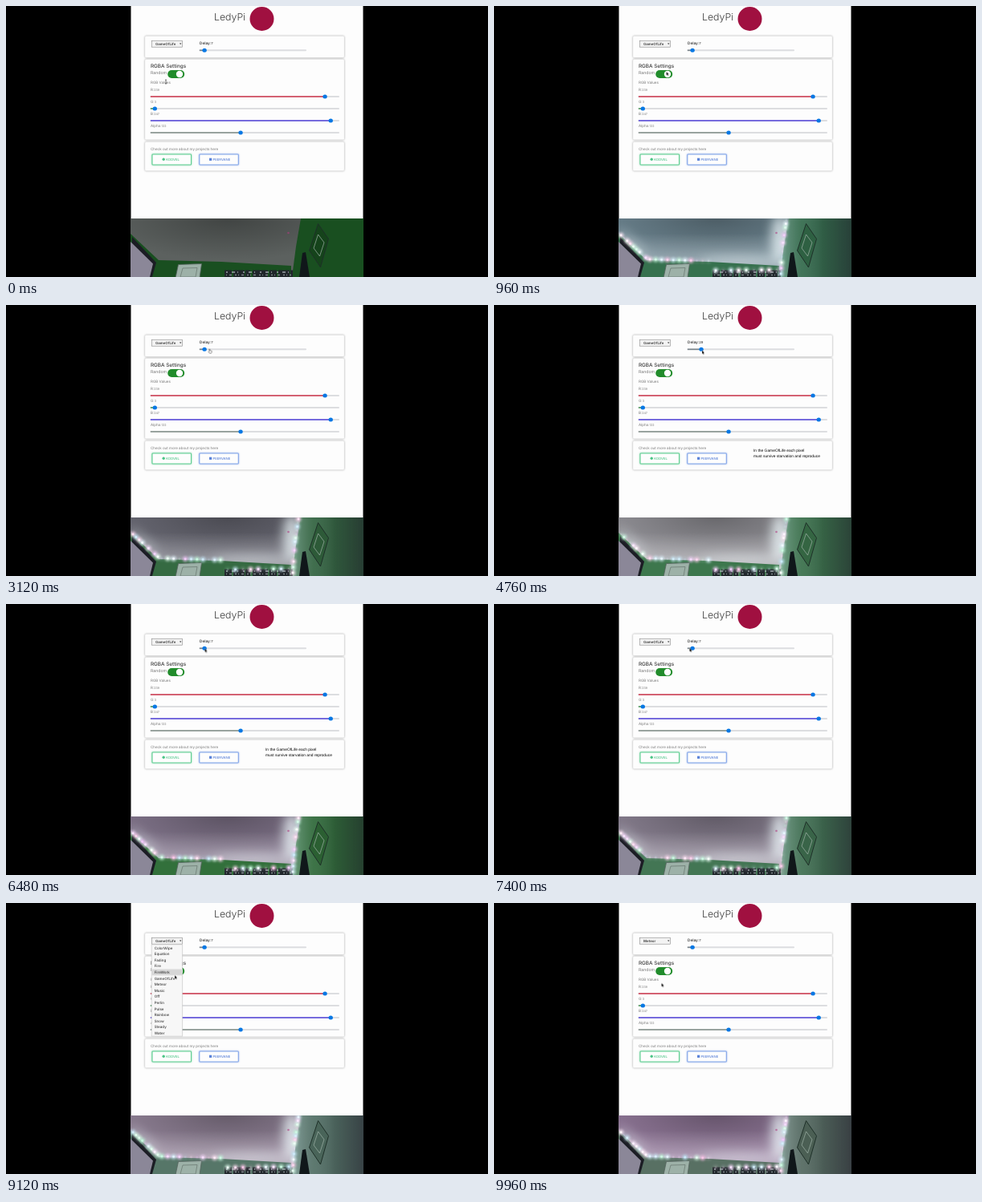
An HTML page that plays this animation: 600 by 338 pixels, repeating every 10000 ms.

```html
<!DOCTYPE html>
<html lang="en">
<head>
<meta charset="utf-8">
<title>LedyPi</title>
<style>
html, body { margin: 0; width: 100%; height: 100%; overflow: hidden; background: #000; }
svg { display: block; width: 100vw; height: 100vh; }
text { font-family: Inter, sans-serif; text-rendering: geometricPrecision; fill: #3a3a3a; }
.soft { fill: #777; }
.note { font-family: "Liberation Sans", Arial, sans-serif; font-size: 4.9px; fill: #000; }
.card { fill: #fdfdfd; stroke: #e6e6e6; stroke-width: .4; filter: drop-shadow(0 .7px .8px #0005); }
.button { fill: #fdfdfd; stroke-width: 1.1; }

.step { animation: 10s step-end infinite; }
.note1 { animation-name: note1; }
.note2 { animation-name: note2; }
.menu { animation-name: menu; }
.hover { animation-name: hover; }
.life { animation-name: life; }
.meteor { animation-name: meteor; }
.beam { animation-name: beam; }
.hand { animation-name: hand; }
.arrow { animation-name: arrow; }
@keyframes note1 { 0% { opacity: 0 } 10.4% { opacity: 1 } 28% { opacity: 0 } }
@keyframes note2 { 0% { opacity: 0 } 36% { opacity: 1 } 70% { opacity: 0 } }
@keyframes menu { 0% { opacity: 0 } 81.6% { opacity: 1 } 96.4% { opacity: 0 } }
@keyframes hover {
  0% { transform: none }
  87% { transform: translateY(-38px); animation-timing-function: steps(6) }
  92.7%, 100% { transform: translateY(7.6px) }
}
@keyframes life { 0% { opacity: 1 } 96.4% { opacity: 0 } }
@keyframes meteor { 0% { opacity: 0 } 96.4% { opacity: 1 } }
@keyframes beam { 0% { opacity: 1 } 9% { opacity: 0 } }
@keyframes hand { 0% { opacity: 0 } 28% { opacity: 1 } 34% { opacity: 0 } }
@keyframes arrow { 0% { opacity: 0 } 9% { opacity: 1 } 28% { opacity: 0 } 34% { opacity: 1 } }

.cursor { animation: move 10s ease-in-out infinite; }
@keyframes move {
  0%, 4% { transform: translate(199px, 92px) }
  15%, 20% { transform: translate(229px, 72.5px) }
  30%, 31.5% { transform: translate(253.5px, 55px) }
  34%, 35% { transform: translate(247.5px, 56px) }
  40%, 53% { transform: translate(259px, 56.5px) }
  60%, 72% { transform: translate(247.5px, 55.5px) }
  80%, 85% { transform: translate(216px, 51px) }
  94%, 100% { transform: translate(208.5px, 99.8px) }
}

.ceiling { animation: ceiling 10s linear infinite; }
.wall { animation: wall 10s linear infinite; }
.lit { animation: lit 10s linear infinite; }
@keyframes ceiling {
  0%, 4% { fill: #5c615f } 9% { fill: #6d8490 } 18.8% { fill: #7195a5 }
  31.2% { fill: #6b6b76 } 47.6% { fill: #96959b } 64.8% { fill: #84778e }
  83.2% { fill: #928c97 } 99.6%, 100% { fill: #92799a }
}
@keyframes wall {
  0%, 4% { fill: #194f20 } 9% { fill: #36704c } 18.8% { fill: #3c7a6a }
  31.2% { fill: #356a42 } 47.6% { fill: #3d774d } 64.8% { fill: #32703b }
  83.2% { fill: #547c6d } 99.6%, 100% { fill: #587063 }
}
@keyframes lit { 0%, 4% { opacity: 0 } 9%, 100% { opacity: 1 } }
</style>
</head>
<body>
<svg viewBox="0 0 600 338" preserveAspectRatio="none">
  <defs>
    <clipPath id="view"><path d="M155.5 265h289v73h-289z"/></clipPath>
    <filter id="blur" x="-100%" y="-100%" width="300%" height="300%"><feGaussianBlur stdDeviation="7"/></filter>
    <filter id="bloom" x="-20%" y="-20%" width="140%" height="140%"><feGaussianBlur stdDeviation="1.7"/></filter>
    <radialGradient id="shade" cx=".42" cy="0" r=".55" gradientTransform="matrix(1 0 0 1.3 0 0)">
      <stop offset="0" stop-color="#000" stop-opacity=".3"/>
      <stop offset="1" stop-color="#000" stop-opacity="0"/>
    </radialGradient>
    <linearGradient id="bounce" x2="0" y2="1">
      <stop offset=".25" stop-color="#fff" stop-opacity="0"/>
      <stop offset=".75" stop-color="#fff" stop-opacity=".3"/>
    </linearGradient>
    <linearGradient id="falloff">
      <stop offset="0" stop-color="#dff" stop-opacity=".35"/>
      <stop offset=".3" stop-color="#a9b" stop-opacity=".1"/>
      <stop offset=".6" stop-color="#1a1024" stop-opacity=".2"/>
      <stop offset="1" stop-color="#1a1024" stop-opacity=".5"/>
    </linearGradient>
  </defs>

  <path fill="#fdfdfd" d="M155.5 0h289v265h-289z"/>
  <text x="259" y="18.2" font-size="12.3" font-weight="300">LedyPi</text>
  <circle cx="318.5" cy="16" r="15" fill="#a01040"/>

  <rect class="card" x="173" y="37.5" width="248" height="26.8" rx="1.5"/>
  <rect class="card" x="173" y="66.5" width="248" height="100.3" rx="1.5"/>
  <rect class="card" x="173" y="169.5" width="248" height="36" rx="1.5"/>

  <rect x="181.6" y="43.2" width="37.8" height="8" fill="#f3f3f3" stroke="#888" stroke-width=".6"/>
  <g font-size="4.4" font-weight="600">
    <text class="step life" x="186" y="48.9">GameOfLife</text>
    <text class="step meteor" x="186" y="48.9">Meteor</text>
  </g>
  <path d="M216 46.4h2.4l-1.2 1.7z" fill="#222"/>
  <text x="241" y="48.2" font-size="4.7" font-weight="600">Delay:<tspan id="delay" font-size="4.1" font-weight="500">7</tspan></text>

  <text x="180" y="77.3" font-size="6.35" font-weight="500">RGBA Settings</text>
  <text class="soft" x="180" y="85.2" font-size="5.2">Random</text>
  <rect x="201.2" y="80" width="21" height="10" rx="5" fill="#218c2b"/>
  <circle cx="216" cy="85" r="4.2" fill="#fff"/>
  <text class="soft" x="180" y="97.3" font-size="4.55">RGB Values</text>
  <g id="sliders"></g>

  <text class="soft" x="180" y="179.9" font-size="4.5">Check out more about my projects here</text>
  <g font-size="4.2" font-weight="500">
    <rect class="button" x="182" y="185" width="48.5" height="13" rx=".8" stroke="#5fce92" style="filter:drop-shadow(0 .5px .8px #3cbd7899)"/>
    <circle cx="196.2" cy="191.3" r="1.7" fill="#4cc587"/>
    <text x="199.3" y="192.9" style="fill:#4cc587">KODVEL</text>
    <rect class="button" x="240.8" y="185" width="48.5" height="13" rx=".8" stroke="#7fa3e8" style="filter:drop-shadow(0 .5px .8px #658be099)"/>
    <rect x="253" y="189.7" width="3.2" height="3.2" fill="#5a82d8"/>
    <text x="257.5" y="192.9" style="fill:#5a82d8">PEERVANE</text>
  </g>
  <text class="note step note1" x="320.5" y="186.6">Patterns can also be games like this one</text>
  <g class="step note2">
    <text class="note" x="323" y="183.4">In the GameOfLife each pixel</text>
    <text class="note" x="323" y="189.9">must survive starvation and reproduce</text>
  </g>

  <g class="step menu">
    <path d="M181.2 51.8h38.4v114.4h-38.4z" fill="#f7f7f7" stroke="#b5b5b5" stroke-width=".5"/>
    <path class="step hover" d="M181.5 90.2h37.8v7.6h-37.8z" fill="#d6d6d6"/>
    <g id="items" font-size="4.5" font-weight="500"></g>
  </g>

  <g clip-path="url(#view)">
    <path class="ceiling" d="M155 265h290v73h-290z"/>
    <path fill="url(#shade)" d="M155 265h290v73h-290z"/>
    <g class="lit">
      <path fill="url(#bounce)" d="M155 265h212v73h-212z"/>
      <g filter="url(#blur)" fill="#f2fcff">
        <ellipse cx="356" cy="290" rx="11" ry="30" opacity=".75"/>
        <ellipse cx="172" cy="296" rx="24" ry="5" opacity=".4" transform="rotate(42 172 296)"/>
        <ellipse cx="305" cy="318" rx="50" ry="6" opacity=".4"/>
      </g>
    </g>

    <path class="wall" d="M155 284L190 317 268 319 355 324V338H155z"/>
    <path class="wall" d="M367 265H445V338H356L361 300z"/>
    <path class="lit" fill="url(#falloff)" d="M367 265H445V338H356L361 300z"/>

    <path fill="#1b1d24" d="M157 288L187 320 182 338H155z"/>
    <path fill="#8b8798" d="M155 294L183 321.5 179 338H155z"/>
    <path fill="#9db1a8" stroke="#55635d" stroke-width=".8" d="M214.5 322.5L243.5 321.5 241 339H211z"/>
    <path fill="none" stroke="#66756d" stroke-width=".7" d="M220 327L238 326.5 236 338H217z"/>
    <path class="wall" stroke="#22352d" stroke-width="1" d="M388.5 271.5L401.5 290.5 391.5 326 377.5 305z"/>
    <path fill="#000" opacity=".15" d="M388.5 271.5L401.5 290.5 391.5 326 377.5 305z"/>
    <path fill="none" stroke="#9fb3a8" stroke-width=".7" d="M388.5 285L396 295 390.5 312 383 302z"/>
    <path fill="#10171a" d="M369 308L373 307 378 338H365z"/>
    <path stroke="#20262b" stroke-width="9" stroke-dasharray="9 2 14 1 6 3 19 2" d="M272 334H357"/>
    <path stroke="#9aa3a6" stroke-width="1.6" stroke-dasharray="2 5 4 3 1 6" d="M274 332H355"/>
    <path stroke="#7c8588" stroke-width="1.4" stroke-dasharray="1 3 3 4 2 2" d="M274 335.5H355"/>
    <circle cx="351.5" cy="283" r="1.3" fill="#b03a80" opacity=".6"/>
    <g class="lit">
      <g id="glow" filter="url(#bloom)"></g>
      <g id="leds"></g>
    </g>
  </g>

  <g class="cursor">
    <path class="step beam" d="M-.8 0H.8M0 0V5M-.8 5H.8" stroke="#111" stroke-width=".6"/>
    <path class="step arrow" d="M0 0V4.6L1 3.7 1.8 5.3 2.6 4.9 1.8 3.3 3.2 3.2z" fill="#000" stroke="#fff" stroke-width=".25"/>
    <path class="step hand" d="M-.5 0H.3V1.8L2.6 2.3V4L2 5.2H-.2L-1.5 3.3-1 2.8-.5 3.2z" fill="#fff" stroke="#222" stroke-width=".45"/>
  </g>
</svg>
<script>
const LOOP = 10000;
const $ = id => document.getElementById(id);
const clamp = x => Math.min(1, Math.max(0, x));
const ease = x => x * x * (3 - 2 * x);
const rand = (a, b) => {
  const x = Math.sin(a * 12.9898 + b * 78.233) * 43758.5453;
  return x - Math.floor(x);
};

// The thumb travels inside the track, 2.6 px short of both ends.
const thumbX = (x, width, value) => x + 2.6 + (width - 5.2) * value / 255;

function slider(id, x, y, width, value, color) {
  const tx = thumbX(x, width, value);
  return `<path d="M${x} ${y}h${width}" stroke="#dcdde0" stroke-width="2" stroke-linecap="round"/>
    <path id="${id}Fill" d="M${x} ${y}H${tx}" stroke="${color}" stroke-width="1.6"/>
    <ellipse id="${id}Thumb" cx="${tx}" cy="${y}" rx="2.7" ry="2.5" fill="#0878e4"/>`;
}

const channels = [
  ['R', 239, '#d2384e'], ['G', 3, '#4d9b5f'],
  ['B', 247, '#5546dc'], ['Alpha', 122, '#83908a']
];
$('sliders').innerHTML = slider('delay', 241, 55.3, 132, 7, '#7b858c') +
  channels.map(([name, value, color], i) => {
    const y = 113 + 15 * i;
    return `<text class="soft" x="180" y="${y - 7.3}" font-size="4.5">${name}:<tspan font-size="3.7">${value}</tspan></text>` +
      slider(name, 180, y, 234, value, color);
  }).join('');

$('items').innerHTML = ('ColorWipe Equation Fading Fire FireWork GameOfLife Meteor Music ' +
  'Off Perlin Pulse Rainbow Snow Steady Water').split(' ')
  .map((name, i) => `<text x="184.7" y="${57.6 + 7.6 * i}">${name}</text>`).join('');

// LED runs: start, end, count
const runs = [
  [158, 286, 189, 314, 9], [194, 316, 267, 318, 11],
  [364, 267, 359, 300, 8], [359, 306, 357, 334, 5], [276, 330, 352, 329, 9]
];
const spots = runs.flatMap(([x1, y1, x2, y2, n]) =>
  Array.from({ length: n }, (_, i) => {
    const k = i / (n - 1);
    return [x1 + (x2 - x1) * k, y1 + (y2 - y1) * k];
  }));
const dots = r => spots.map(([x, y]) => `<circle cx="${x}" cy="${y}" r="${r}"/>`).join('');
$('glow').innerHTML = dots(3.4);
$('leds').innerHTML = dots(1.4);
const glow = $('glow').children, leds = $('leds').children;

function drawLeds(t, delay) {
  const step = Math.floor(t / (delay > 18 ? 240 : 120));
  for (let i = 0; i < spots.length; i++) {
    const on = rand(i, step) < .72;
    const hue = [290, 150, 200, 320][Math.floor(rand(i + 50, step) * 4)];
    const light = 88 + 11 * rand(i + 90, step);
    glow[i].setAttribute('fill', `hsl(${hue} 65% ${light - 4}%)`);
    glow[i].setAttribute('opacity', on ? .8 : .15);
    leds[i].setAttribute('fill', `hsl(${hue} 80% ${light}%)`);
    leds[i].setAttribute('opacity', on ? 1 : .2);
  }
}

function frame(now) {
  const t = now % LOOP;
  const drag = ease(clamp((t - 3500) / 500)) - ease(clamp((t - 5300) / 700));
  const delay = Math.round(7 + 22 * drag);
  const x = thumbX(241, 132, delay);
  $('delay').textContent = delay;
  $('delayFill').setAttribute('d', `M241 55.3H${x}`);
  $('delayThumb').setAttribute('cx', x);
  drawLeds(t, delay);
  requestAnimationFrame(frame);
}
requestAnimationFrame(frame);
</script>
</body>
</html>
```
